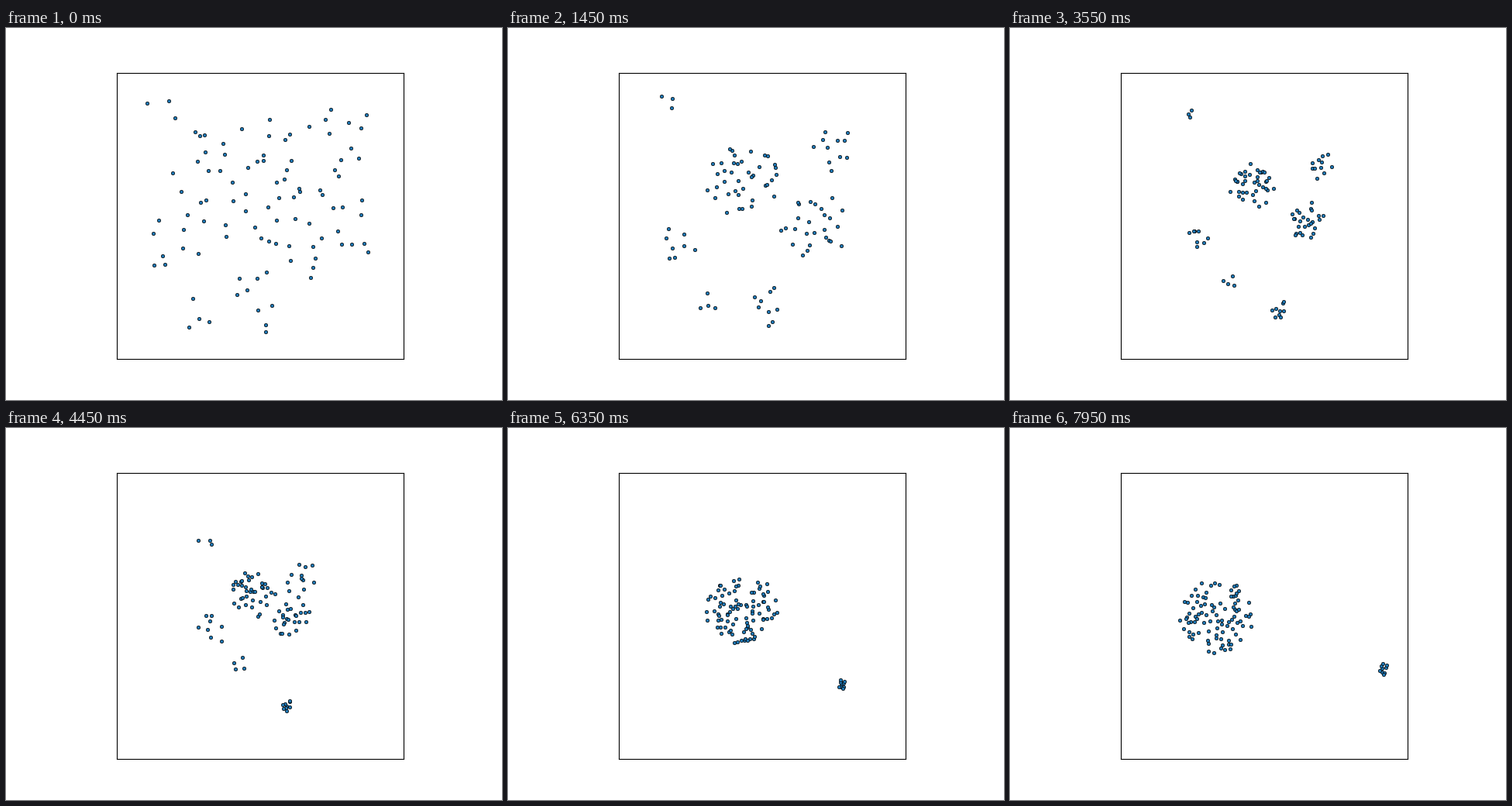
These frames come from a looping animation (640 px wide and 480 px high, 8000 ms). A matplotlib script:

```python
import numpy as np
import matplotlib.pyplot as plt
from matplotlib.animation import FuncAnimation

FRAMES, STEP = 160, 50
END = 7.95                # seconds
GATHERED = 2.65
LOOSE, TIGHT = 14, 5      # disc radius per root of the dot count
GOLDEN = np.pi * (3 - np.sqrt(5))
rng = np.random.default_rng(11)


def disc(n, room):
    """n loosely even places in a disc, as complex numbers."""
    i = np.arange(n)
    radius = room * np.sqrt(i + rng.uniform(0, 1, n))
    angle = GOLDEN * i + rng.uniform(0, 2 * np.pi) + rng.normal(0, 0.4, n)
    return radius * np.exp(1j * angle)


def smooth(t, begin, end):
    u = np.clip((t - begin) / (end - begin), 0, 1)
    return u * u * (3 - 2 * u)


class Flock:
    """Dots that gather at a meeting point, then follow a drifting goal."""

    def __init__(self, start, meet, layout, goal, drift):
        n = len(layout)
        self.start = complex(*start) + disc(n, LOOSE)
        self.meet = complex(*meet) + disc(n, TIGHT)
        self.goal = complex(*goal) + layout
        self.drift = complex(*drift)

    def at(self, t):
        near = min(t / GATHERED, 1)
        late = smooth(t, 2.3, 7.3)
        z = self.start + (self.meet - self.start) * near
        return z + (self.goal - self.drift * (END - t) - z) * late


# dot count, starting centre and meeting point of the flocks that merge
merging = [
    (3, (202, 104), (212, 90)),
    (11, (430, 138), (409, 169)),
    (39, (300, 192), (303, 196)),
    (26, (406, 258), (386, 253)),
    (8, (216, 280), (225, 278)),
    (4, (248, 364), (267, 341)),
]
crowd = disc(sum(n for n, *_ in merging), TIGHT)
rng.shuffle(crowd)

flocks = []
for n, start, meet in merging:
    mine, crowd = crowd[:n], crowd[n:]
    flocks.append(Flock(start, meet, mine, (266, 243), (-20, 3)))
# one flock leaves to the right
flocks.append(Flock((323, 352), (344, 364), disc(9, TIGHT / 2),
                    (482, 311), (26, -10)))


def places(t):
    z = np.concatenate([f.at(t) for f in flocks])
    return np.column_stack([z.real, z.imag])


fig, ax = plt.subplots(figsize=(6.4, 4.8), dpi=100)
ax.set(xlim=(143.2, 512.8), ylim=(427.2, 57.6), xticks=[], yticks=[])
ax.set_aspect("equal")
dots = ax.scatter(*places(0).T, s=10, c="#1f77b4",
                  edgecolors="black", linewidths=0.5)


def update(frame):
    dots.set_offsets(places(frame * STEP / 1000))
    return dots,


anim = FuncAnimation(fig, update, frames=FRAMES, interval=STEP,
                     repeat=True, repeat_delay=0)
plt.show()
```
